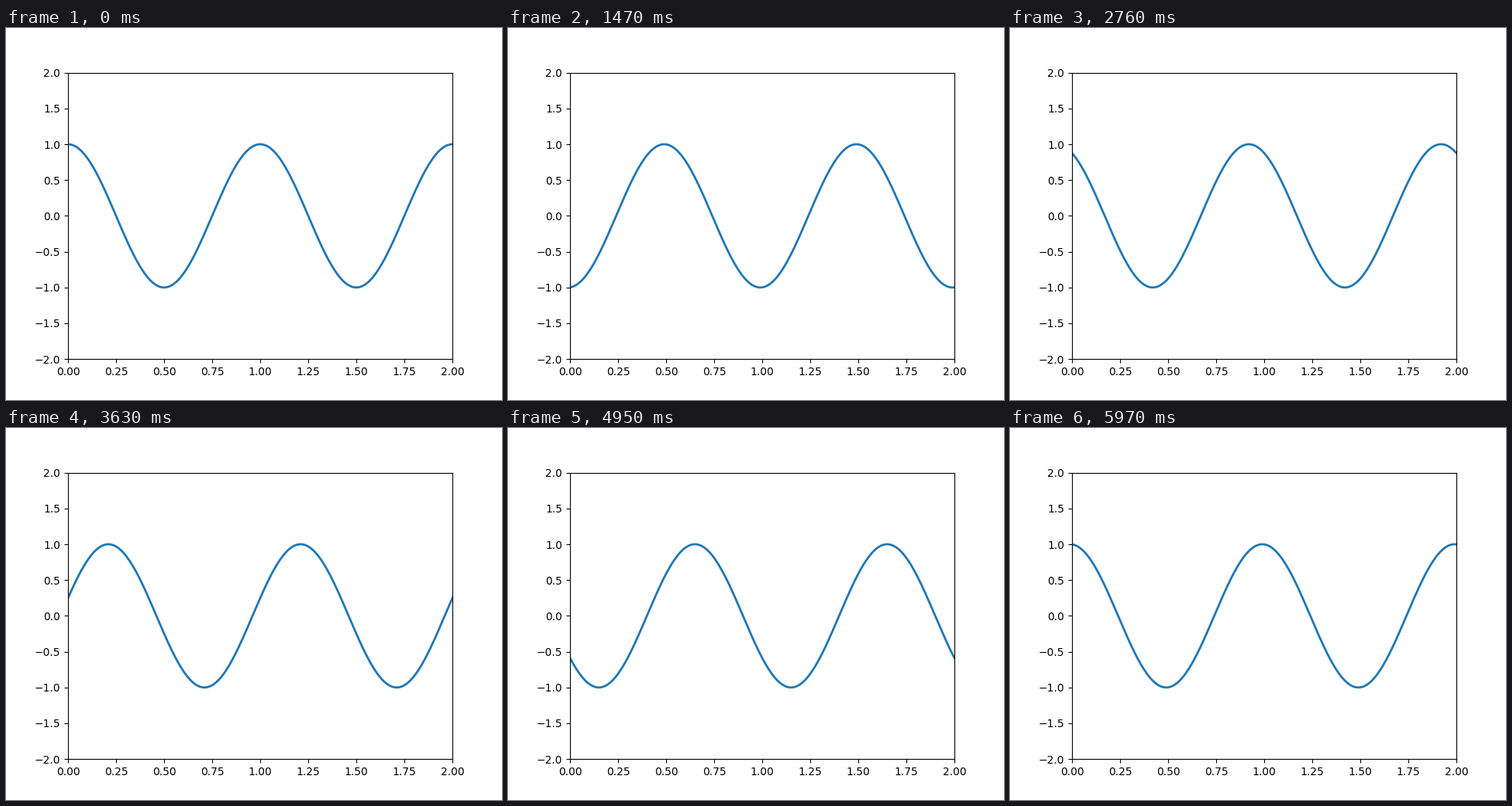
Write a matplotlib script that moves like this. It is 640 px wide and 480 px high and loops after 6 s.

```python
import numpy as np
import matplotlib.pyplot as plt
from matplotlib.animation import FuncAnimation

FRAMES = 200
INTERVAL = 30  # ms
SHIFT = 0.01   # wave travel per frame, in x units

fig = plt.figure(figsize=(6.4, 4.8), dpi=100)
ax = plt.axes(xlim=(0, 2), ylim=(-2, 2))
x = np.linspace(0, 2, 1000)
line, = ax.plot([], [], lw=2)


def update(i):
    line.set_data(x, np.cos(2 * np.pi * (x - SHIFT * i)))
    return line,


anim = FuncAnimation(fig, update, init_func=lambda: update(0), frames=FRAMES,
                     interval=INTERVAL, repeat=True, repeat_delay=0, blit=False)

plt.show()
```
